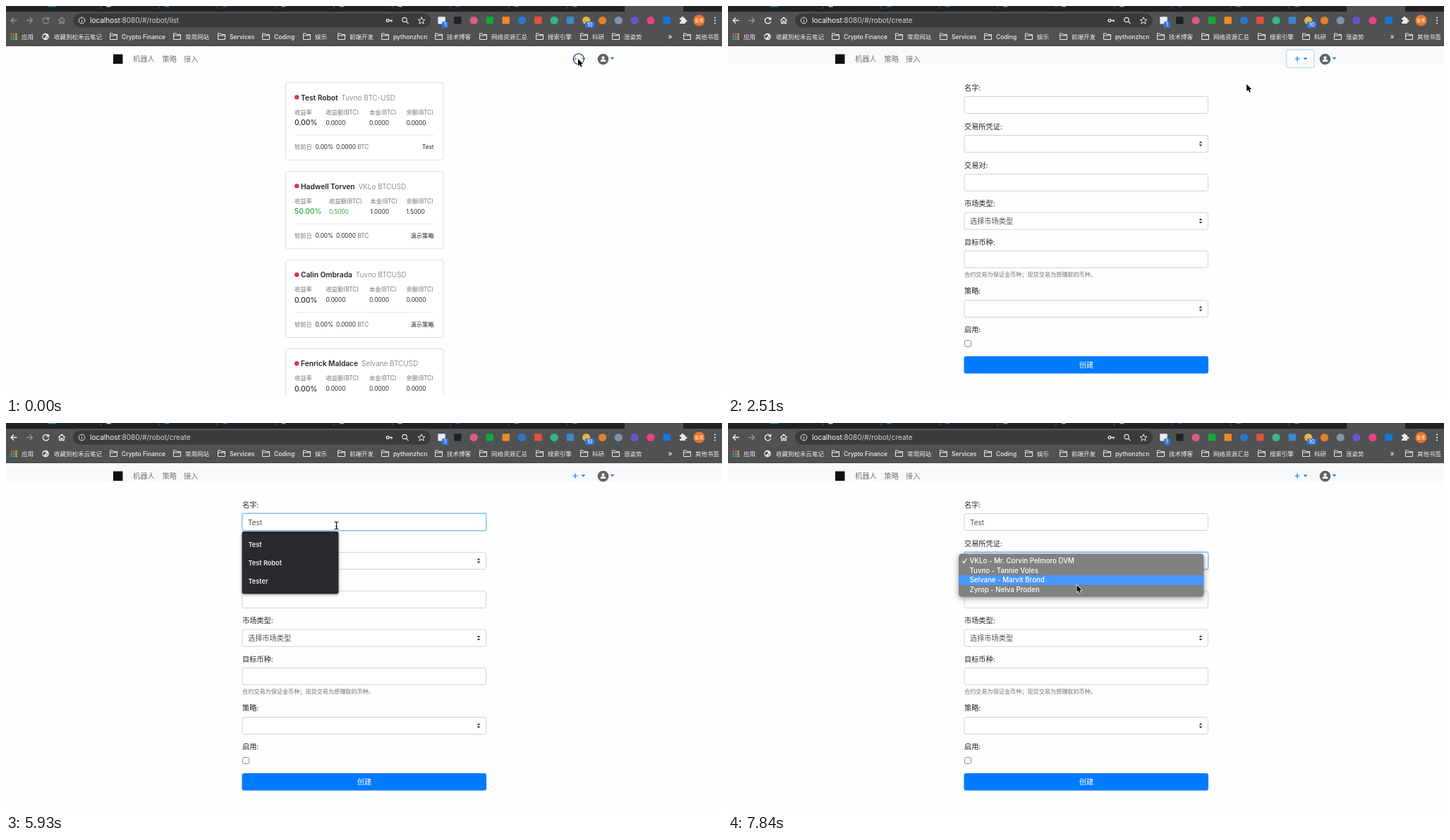
An HTML page with a canvas that plays this animation: 1015 by 552 pixels, repeating every 7.99 s.

```html
<!DOCTYPE html>
<html lang="zh-CN">
<head>
<meta charset="utf-8">
<title>Robot list</title>
<style>
html, body { margin: 0; width: 100%; height: 100%; overflow: hidden; background: #fefefe; }
canvas { display: block; width: 1015px; height: 552px; }
</style>
</head>
<body>
<canvas id="stage"></canvas>
<script>
const W = 1015, H = 552, LOOP = 7990;
const FONT = 'Inter, "Noto Sans CJK SC", "Noto Sans CJK", sans-serif';
const INK = '#212529', GRAY = '#6c757d', BLUE = '#007bff', GREEN = '#28a745';
const BAR = '#505153', LIGHT = '#e9eaec', DIM = '#929396';

const canvas = document.getElementById('stage');
const ctx = canvas.getContext('2d');
const dpr = window.devicePixelRatio || 1;
canvas.width = W * dpr;
canvas.height = H * dpr;

// Bursts of screen updates: first time, last time, number of updates
const BURSTS = [[150, 440, 3], [740, 1770, 8], [1920, 2960, 8], [3100, 3550, 4],
  [3850, 3850, 1], [4450, 4450, 1], [4750, 5330, 5], [5930, 6650, 6], [7250, 7840, 5]];

// Pointer stops: time, x, y
const STOPS = [[0, 811, 75], [740, 811, 75], [1620, 768, 103], [1920, 767, 107],
  [2360, 767, 107], [3100, 469, 144], [5930, 468.5, 145.5], [6360, 501, 199],
  [7110, 501, 199], [7840, 494.5, 230]];

function snap(t) {
  let last = 0;
  for (const [a, b, n] of BURSTS) {
    for (let i = 0; i < n; i++) {
      const s = Math.floor((a + (b - a) * i / Math.max(n - 1, 1)) / 10) * 10;
      if (s <= t + 0.5) last = s;
    }
  }
  return last;
}

function pointerAt(t) {
  for (let i = 1; i < STOPS.length; i++) {
    const [t0, x0, y0] = STOPS[i - 1], [t1, x1, y1] = STOPS[i];
    if (t <= t1) {
      const k = (t - t0) / (t1 - t0), e = k * k * (3 - 2 * k);
      return [x0 + (x1 - x0) * e, y0 + (y1 - y0) * e];
    }
  }
  return STOPS[STOPS.length - 1].slice(1);
}

// y is the vertical middle of the line; returns the right edge
function text(s, x, y, size, color = INK, weight = 400, align = 'left') {
  ctx.font = `${weight} ${size}px ${FONT}`;
  ctx.fillStyle = color;
  ctx.textAlign = align;
  ctx.fillText(s, x, y + size * 0.36);
  return x + ctx.measureText(s).width;
}

function rect(x, y, w, h, fill) {
  ctx.fillStyle = fill;
  ctx.fillRect(x, y, w, h);
}

function box(x, y, w, h, r, fill, stroke, line = 1) {
  ctx.beginPath();
  ctx.roundRect(x, y, w, h, r);
  if (fill) { ctx.fillStyle = fill; ctx.fill(); }
  if (stroke) { ctx.strokeStyle = stroke; ctx.lineWidth = line; ctx.stroke(); }
}

function disc(x, y, r, fill, stroke, line = 1) {
  ctx.beginPath();
  ctx.arc(x, y, r, 0, Math.PI * 2);
  if (fill) { ctx.fillStyle = fill; ctx.fill(); }
  if (stroke) { ctx.strokeStyle = stroke; ctx.lineWidth = line; ctx.stroke(); }
}

function path(d, x, y, fill, stroke, line = 1) {
  const p = new Path2D(d);
  ctx.save();
  ctx.translate(x, y);
  ctx.lineJoin = 'round';
  if (stroke) { ctx.strokeStyle = stroke; ctx.lineWidth = line; ctx.stroke(p); }
  if (fill) { ctx.fillStyle = fill; ctx.fill(p); }
  ctx.restore();
}

function shadow(color, blur, dy, draw) {
  ctx.save();
  ctx.shadowColor = color;
  ctx.shadowBlur = blur * dpr;
  ctx.shadowOffsetY = dy * dpr;
  draw();
  ctx.restore();
}

/* Browser window */

function tabStrip() {
  rect(0, 0, W, 8, '#202124');
  box(877, -6, 83, 14, 0, BAR);
  for (let i = 0; i < 9; i++) rect(134 + i * 82.6, 0, 1, 4, '#56575a');
  const marks = ['#16a765', '#ddd', '#2d7ff0', '#2d6fe0', '#999', '#aaa', '#aaa', '#c22', '#777', '#777'];
  marks.forEach((c, i) => rect(60 + i * 82.6, 0, i ? 6 : 11, 1.3, c));
}

function navIcons(active) {
  const on = active ? '#f4f4f5' : DIM;
  path('M4.5 0H-4M0 -4L-4 0L0 4', 11, 20.5, null, on, 1.3);
  path('M-4.5 0H4M0 -4L4 0L0 4', 33.5, 20.5, null, DIM, 1.3);
  path('M3 -2.8A4.2 4.2 0 1 0 4.2 1', 56.5, 20.5, null, on, 1.3);
  path('M4.8 -5V-.8H.6Z', 56.5, 20.5, on);
  path('M-4.6 0L0 -4.3L4.6 0M-3.2 -1V4.2H-1V1H1V4.2H3.2V-1', 79, 20.5, null, on, 1.2);
}

function omnibox(url) {
  box(95, 10.5, 507, 20, 10, '#3a3b3d');
  disc(107.5, 20.5, 4.3, null, LIGHT, 1);
  rect(107, 20, 1, 3, LIGHT);
  rect(107, 18, 1, 1, LIGHT);
  const x = text('localhost', 119, 20.5, 10, '#fff');
  text(':8080/#/robot/' + url, x, 20.5, 10, '#d4d5d7');
  disc(541, 20.5, 1.9, null, LIGHT, 1.3);
  path('M2 0H7M5.5 0V2.2', 541, 20.5, null, LIGHT, 1.4);
  disc(565, 19.5, 3.2, null, LIGHT, 1.2);
  path('M0 0L3.2 3.2', 567.4, 21.9, null, LIGHT, 1.3);
  path('M0 -5L1.4 -1.6L5 -1.4L2.2 .9L3.1 4.4L0 2.4L-3.1 4.4L-2.2 .9L-5 -1.4L-1.4 -1.6Z',
    589, 20.8, null, LIGHT, 1);
}

function badge(s, x, w) {
  box(x, 22, w, 9, 2, '#3476e0');
  text(s, x + w / 2, 26.6, 7, '#fff', 500, 'center');
}

function extensions() {
  const colors = ['#e6ecf7', '#202124', '#dd5a87', '#15a83a', '#ee8b24', '#2879c9', '#e8503a', '#35b58a',
    '#3d87c9', '#e7b53c', '#e2812b', '#7d93ad', '#6657c9', '#e8427f', '#1976d2'];
  const square = [0, 1, 3, 4, 6, 8, 14];
  colors.forEach((c, i) => {
    const x = 617.5 + i * 22.8;
    if (square.includes(i)) box(x - 5.2, 15.2, 10.4, 10.4, 1, c);
    else disc(x, 20.5, 5.6, c);
  });
  badge('1', 618, 9);
  badge('10', 821, 13);
  path('M-4 -3H-1.6A1.7 1.7 0 1 1 1.6 -3H4V-.4A1.7 1.7 0 1 1 4 2.6V5H-4V2.4A1.6 1.6 0 1 0 -4 -.6Z',
    959, 20, LIGHT);
  disc(982.5, 20.5, 8, '#e8752b');
  text('安禾', 982.5, 20.5, 6.5, '#fff', 400, 'center');
  for (let i = -1; i < 2; i++) disc(1005, 20.5 + i * 4, 1.1, LIGHT);
}

function folder(x, label) {
  path('M.5 1.5V8.5H10.5V1.5H5.5L4.3 0H.5Z M.5 3H10.5', x, 39, null, LIGHT, 1);
  text(label, x + 17, 43.5, 8.5, '#f1f1f2', 500);
}

function bookmarks() {
  const dots = ['#e8503a', '#e8503a', '#efb52e', '#3fae5a', '#4a8af0', '#efb52e', '#3fae5a', '#4a8af0', '#efb52e'];
  dots.forEach((c, i) => rect(6.5 + i % 3 * 3.4, 39 + Math.floor(i / 3) * 3.4, 2.4, 2.4, c));
  text('应用', 22, 43.5, 8.5, '#f1f1f2', 500);
  disc(56, 43.5, 4.8, LIGHT);
  path('M-3 -2L0 -3L1 -1L-1 1L-2 3L-4 0Z M1 1L3.5 0L2 3Z', 56, 43.5, BAR);
  text('收藏到松禾云笔记', 68, 43.5, 8.5, '#f1f1f2', 500);
  const items = { 'Crypto Finance': 147, '常用网站': 237, 'Services': 300, 'Coding': 363, '娱乐': 421,
    '前端开发': 470, 'pythonzhcn': 532, '技术博客': 608, '网络资源汇总': 671, '搜索引擎': 751,
    '科研': 814, '涨姿势': 859, '其他书签': 960 };
  for (const label in items) folder(items[label], label);
  text('»', 938.5, 43, 10, LIGHT, 500);
}

function browser(t) {
  rect(0, 0, W, 57, BAR);
  tabStrip();
  navIcons(t >= 150);
  omnibox(t < 2360 ? 'list' : 'create');
  extensions();
  bookmarks();
  rect(0, 56, W, 1, '#434446');
}

/* Page */

function caretDown(x, y) {
  path('M-3 -1.6H3L0 1.6Z', x, y, BLUE);
}

function header(t) {
  if (t >= 290) rect(0, 57, W, 26, '#f8f9fa');
  box(152, 68.5, 13.5, 13.5, 0, '#111');
  text('机器人', 180, 75.5, 10.3, '#747678');
  text('策略', 221.5, 75.5, 10.3, '#747678');
  text('接入', 252, 75.5, 10.3, '#747678');
  if (t >= 2360 && t < 3550) {
    box(791.5, 62, 39.5, 25.5, 3, '#fcfdff', '#cfe2fb', 1.8);
  }
  path('M-3.5 0H3.5M0 -3.5V3.5', 807, 75, null, BLUE, 1.2);
  caretDown(818.5, 75);
  disc(846.5, 75.5, 7.8, '#5d6368');
  disc(846.5, 73.3, 2.1, '#fff');
  path('M-4 3.6A4 3.4 0 0 1 4 3.6Z', 846.5, 75.4, '#fff');
  caretDown(859.5, 74.5);
}

const COLS = [409, 453.5, 515, 567.5];
const CARDS = [
  { name: 'Test Robot', pair: 'Tuvno BTC-USD', tag: 'Test' },
  { name: 'Hadwell Torven', pair: 'VKLo BTCUSD', cols: [409, 458, 516.5, 567.5],
    vals: ['50.00%', '0.5000', '1.0000', '1.5000'], up: true },
  { name: 'Calin Ombrada', pair: 'Tuvno BTCUSD' },
  { name: 'Fenrick Maldace', pair: 'Selvane BTCUSD' }
];

function card(c, top) {
  const cols = c.cols || COLS, vals = c.vals || ['0.00%', '0.0000', '0.0000', '0.0000'];
  box(396.5, top, 223.5, 110, 3, '#fff', '#dcdddf');
  disc(412.2, top + 20.8, 3.2, '#dc3545');
  const end = text(c.name, 418, top + 21.3, 10.2, INK, 600);
  text(c.pair, end + 5, top + 21.3, 10, GRAY, 300);
  ['收益率', '收益额(BTC)', '本金(BTC)', '余额(BTC)'].forEach((label, i) => {
    const color = c.up && i < 2 ? GREEN : INK;
    text(label, cols[i], top + 42, 8.25, GRAY);
    text(vals[i], cols[i], top + (i ? 57 : 56.5), i ? 8.25 : 10.2, color, i ? 400 : 500);
  });
  rect(409, top + 74, 197.5, 1, '#e6e7e8');
  text('较前日', 409, top + 91.3, 8.25, GRAY);
  text('0.00%', 438.5, top + 91.3, 8.25);
  const x = text('0.0000 ', 468, top + 91.3, 8.25);
  text('BTC', x, top + 91.3, 8.25, GRAY);
  text(c.tag || '演示策略', 606.5, top + 91.3, 8.25, INK, 400, 'right');
}

function addMenu([px, py]) {
  box(728.5, 89.5, 101.5, 50.5, 3, '#fff', '#d2d3d4');
  ['机器人', '策略'].forEach((label, i) => {
    const y = 95 + i * 20;
    const hot = px > 728 && px < 830 && py >= y && py < y + 20;
    if (hot) rect(729, y - 0.5, 101, 19.7, BLUE);
    text(label, 744, y + 10, 10.2, hot ? '#fff' : INK);
  });
}

function field(y, focus, select) {
  if (focus > 1) box(333.5, y - 1.5, 348.5, 27, 4, '#bfdeff');
  box(335, y, 345.5, 24, 3, '#fff', focus ? '#80bdff' : '#ced4da');
  if (select) {
    path('M-2.4 -.9H2.4L0 -3.7Z M-2.4 .9H2.4L0 3.7Z', 670, y + 12, '#343a40');
  }
}

function form(t) {
  const labels = { '名字:': 116, '交易所凭证:': 171, '交易对:': 226, '市场类型:': 280.5,
    '目标币种:': 335, '策略:': 404.5, '启用:': 459.5 };
  for (const s in labels) text(s, 335, labels[s], 10.2);
  field(128.5, t < 3400 || t >= 6360 ? 0 : t < 3550 ? 1 : 2);
  field(183.5, t >= 6360 ? 2 : 0, true);
  field(238.5);
  field(293, 0, true);
  field(347.5);
  field(417.5, 0, true);
  text('选择市场类型', 343, 305.3, 10.2, '#495057');
  text('合约交易为保证金币种；现货交易为想赚取的币种。', 335, 380.7, 8.15, GRAY);
  box(335.5, 474.5, 9, 9, 2, '#fff', '#8b8c8e');
  box(334.5, 497, 346.5, 24.5, 3, BLUE);
  text('创建', 508, 509.5, 10.2, '#fff', 500, 'center');

  const typed = 'Test'.slice(0, t < 4750 ? 0 : Math.min(4, 1 + Math.floor((t - 4740) / 145)));
  const end = text(typed, 343, 141, 10, '#495057');
  const blink = (t >= 3400 && t < 3850) || (t >= 4450 && t < 5930);
  if (blink) rect(typed ? end + 0.5 : 343, 135, 1, 12, '#333');
}

function suggestions(typed) {
  const items = typed ? ['Test', 'Test Robot', 'Tester']
    : ['BTC起飞', 'fds', 'Test', '测试', '山月与舟', 'fdsfds'];
  shadow('rgba(0,0,0,.4)', 4, 1, () =>
    box(334.5, 154, 137, 11.3 + 25.7 * items.length, 3, '#292a2d'));
  items.forEach((s, i) => text(s, 343.5, 173 + 25.7 * i, 9.2, '#eeeff1', 600));
}

function accounts(hot) {
  const items = ['VKLo - Mr. Corvin Pelmoro DVM', 'Tuvno - Tannie Voles',
    'Selvane - Marvit Brond', 'Zyrop - Nelva Proden'];
  shadow('rgba(0,0,0,.4)', 8, 2, () => box(327, 185.5, 347.5, 61.3, 4.5, '#808182'));
  rect(327, 189 + hot * 13.6, 347.5, 13.6, '#4799ff');
  items.forEach((s, i) => text(s, 342.5, 195.7 + i * 13.6, 9.7, '#fff', 500));
  path('M-2.8 .2L-.8 2.8L3 -3', 335.3, 195.7, null, '#fff', 1.3);
}

/* Pointer */

function pointer(t, [x, y]) {
  const ring = t < 290 || t === 2210 || t === 3400;
  if (ring) disc(x + 0.8, y + 0.3, 7.6, 'rgba(255,255,255,.25)', '#222', 1.1);
  if (t >= 3100 && t < 6070) {
    const beam = 'M-3 -5.2Q0 -5.2 0 -3.5Q0 -5.2 3 -5.2M0 -4V4M-3 5.2Q0 5.2 0 3.5Q0 5.2 3 5.2M-1.5 1.5H1.5';
    path(beam, x, y, null, '#fff', 2.4);
    path(beam, x, y, null, '#111', 1.1);
  } else {
    path('M0 0V10L2.3 7.9L3.9 11.6L5.6 10.9L4 7.3H7.2Z', x, y, '#000', '#fff', 1.5);
  }
}

function draw(now) {
  const t = snap(now % LOOP), pos = pointerAt(t);
  ctx.setTransform(dpr, 0, 0, dpr, 0, 0);
  rect(0, 0, W, H, '#fefefe');
  header(t);
  if (t < 2360) {
    CARDS.forEach((c, i) => card(c, 108.7 + i * 125.9));
    if (t >= 740) addMenu(pos);
  } else {
    form(t);
    if (t >= 3550 && t < 6360) suggestions(t >= 4750);
    if (t >= 6510) accounts(t < 7390 ? 0 : t < 7690 ? 1 : 2);
  }
  browser(t);
  pointer(t, pos);
}

const start = performance.now();
function tick() {
  draw(performance.now() - start);
  requestAnimationFrame(tick);
}
tick();
</script>
</body>
</html>
```
